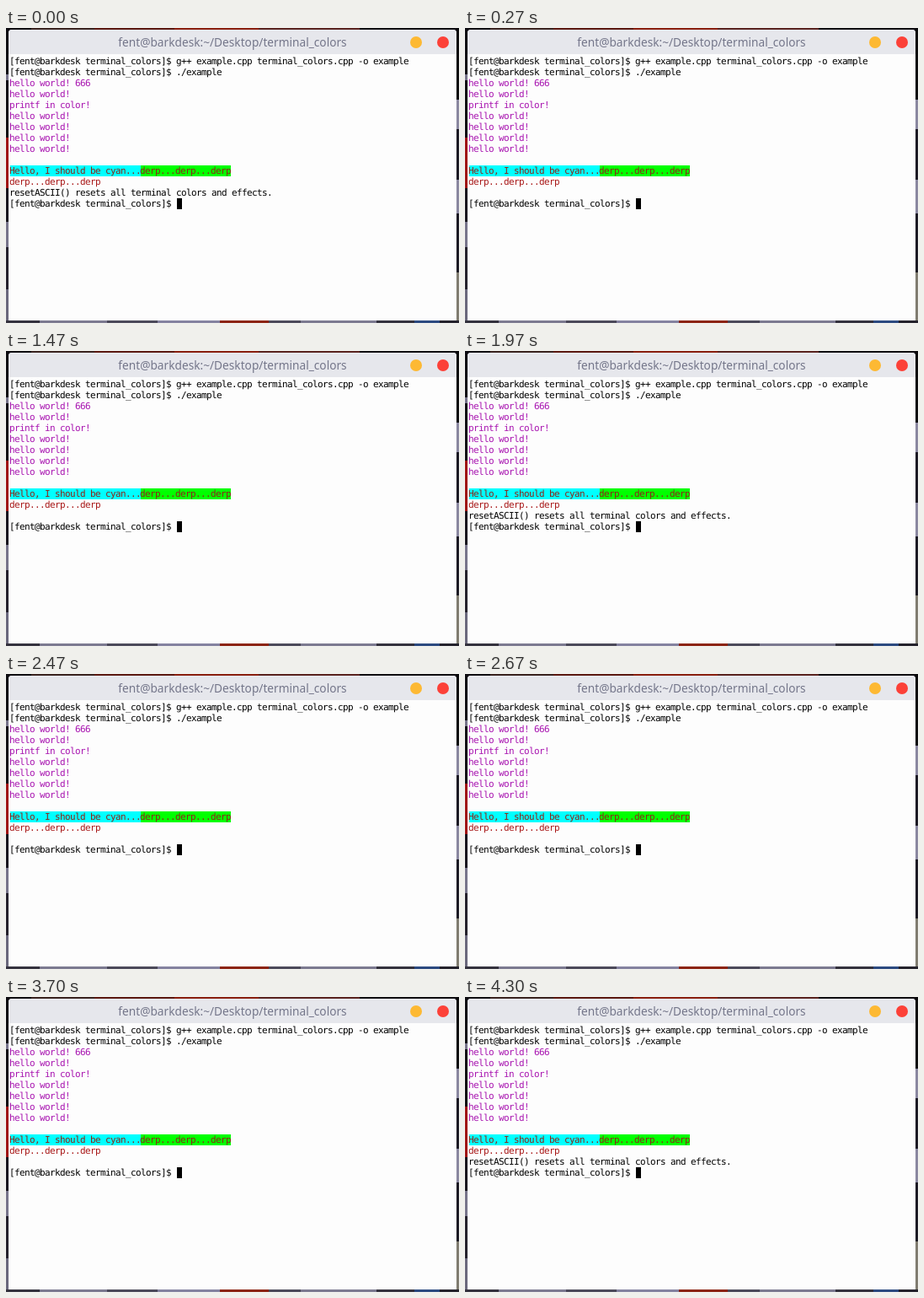
These frames come from a looping animation (538x350 px, 4.33 s). An HTML page:

```html
<!DOCTYPE html>
<html lang="en">
<head>
<meta charset="utf-8">
<title>Terminal colors</title>
<style>
  html, body { margin: 0; width: 100%; height: 100%; overflow: hidden; }
  body { position: relative; background: #14121a; }

  /* Slivers of wallpaper around the window */
  .edge { position: absolute; }
  .top {
    left: 0; top: 0; width: 538px; height: 3px;
    background: linear-gradient(90deg, #100e12 0 30px, #3a2420 30px 105px, #5c1a12 105px 200px,
      #8a2010 200px 300px, #5a2420 300px 420px, #100e12 420px);
  }
  .left {
    left: 0; top: 0; width: 3px; height: 350px;
    background: linear-gradient(#0c0b10 0 55px, #77748a 55px 62px, #0c0b10 62px 130px,
      #a01414 130px 190px, #18161e 190px 230px, #77748a 230px 260px, #24212c 260px 310px, #6a677c 310px);
  }
  .right {
    right: 0; top: 0; width: 3px; height: 350px;
    background: linear-gradient(#08080a 0 85px, #8a87a0 85px 120px, #1c1a24 120px 180px,
      #8a87a0 180px 220px, #1c1a24 220px 290px, #807c70 290px);
  }
  .bottom {
    left: 0; bottom: 0; width: 538px; height: 3px;
    background: linear-gradient(90deg, #34323e 0 40px, #7c7a90 40px 120px, #4c4a5a 120px 180px,
      #8482a0 180px 254px, #8c2414 254px 312px, #4c4a5a 312px 350px, #7c7a90 350px 440px,
      #34323e 440px 485px, #2c4a80 485px 515px, #24222c 515px);
  }

  .window {
    position: absolute; left: 3px; top: 2px; width: 532px; height: 345px;
    border-radius: 4px 4px 0 0; overflow: hidden; background: #fdfdfd;
  }
  .bar {
    position: relative; height: 29px; background: #e6e7ec;
    font: 13.7px/29px "Noto Sans", "Open Sans", sans-serif;
    color: #74768a; text-align: center; white-space: nowrap;
  }
  .button { position: absolute; top: 8px; width: 14px; height: 14px; border-radius: 50%; }
  .min { left: 477px; background: #fdb933; }
  .close { left: 509px; background: #fc4138; }

  /* Character cells are 6 by 13 pixels; glyphs sit 1px left of their cell */
  pre {
    position: absolute; left: 1px; top: 31px; margin: 0; color: #000;
    font: 11px/13px "DejaVu Sans Mono", "Noto Sans Mono", monospace;
    letter-spacing: calc(6px - 1ch);
    font-variant-ligatures: none; text-rendering: geometricPrecision;
  }
  .magenta { color: #a814b0; }
  .red { color: #a81818; }
  .cell {
    display: inline-block; position: relative; left: 1px; height: 13px;
    vertical-align: top; text-indent: -1px; color: #8c2418;
  }
  .cyan { background: #0ff; }
  .green { background: #0f0; }
  .cursor { width: 6px; background: #000; }

  .blink { animation: blink 4330ms step-end infinite; }
  @keyframes blink {
    0%, 15.473%, 43.187%, 70.901%, 99.307% { opacity: 1; }
    0.693%, 29.33%, 57.044%, 85.45% { opacity: 0; }
  }
</style>
</head>
<body>
<div class="edge top"></div>
<div class="edge left"></div>
<div class="edge right"></div>
<div class="edge bottom"></div>
<div class="window">
  <div class="bar">fent@barkdesk:~/Desktop/terminal_colors
    <i class="button min"></i><i class="button close"></i>
  </div>
<pre>[fent@barkdesk terminal_colors]$ g++ example.cpp terminal_colors.cpp -o example
[fent@barkdesk terminal_colors]$ ./example
<span class="magenta">hello world! 666
hello world!
printf in color!
hello world!
hello world!
hello world!
hello world!</span>

<span class="cell cyan">Hello, I should be cyan...</span><span class="cell green">derp...derp...derp</span>
<span class="red">derp...derp...derp</span>
<span class="blink">resetASCII() resets all terminal colors and effects.</span>
[fent@barkdesk terminal_colors]$ <span class="cell cursor"></span></pre>
</div>
</body>
</html>
```
